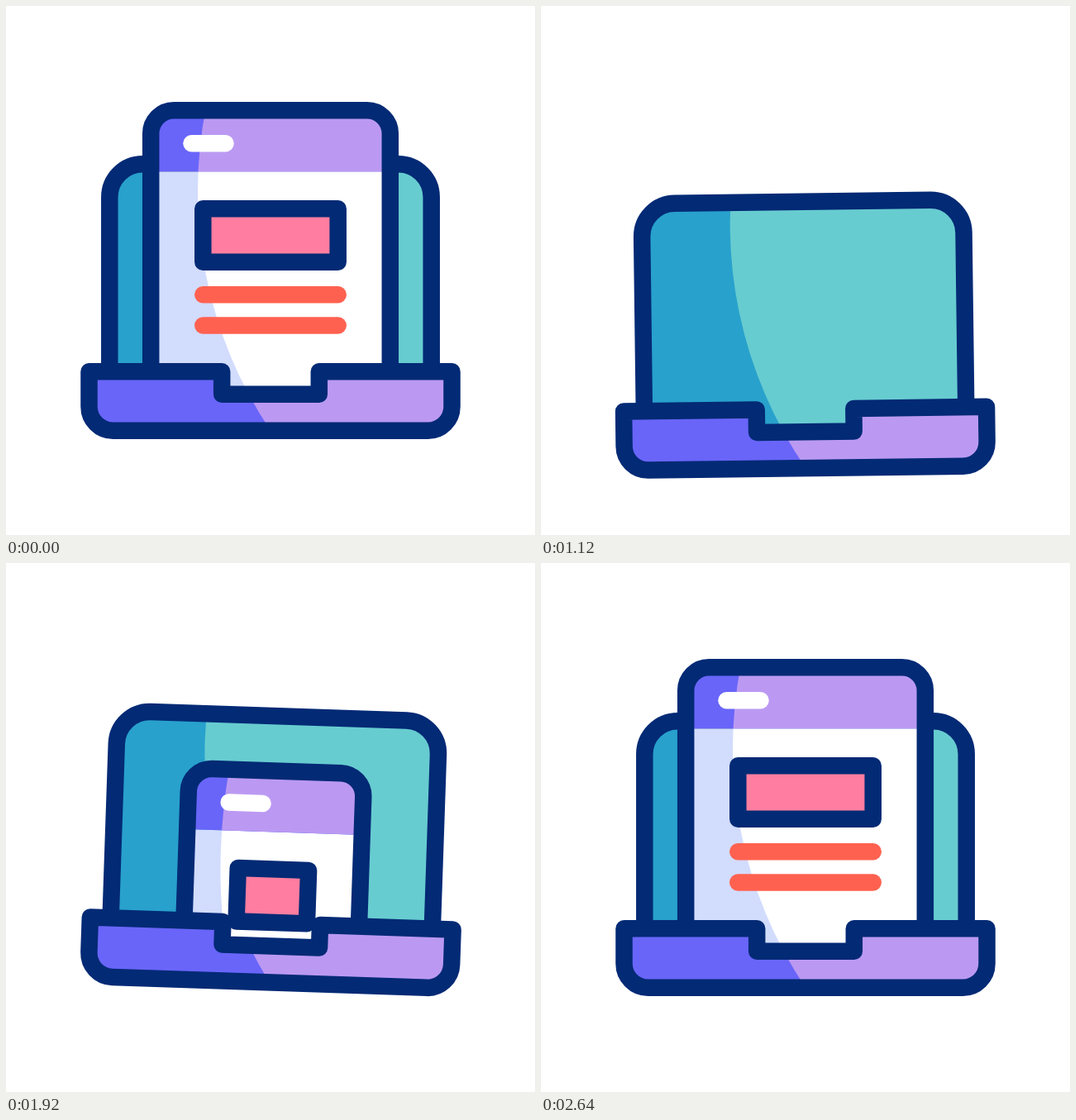
Animation, 640 px wide and 640 px high, one loop 3 s. Source, as an HTML page with a canvas:

```html
<!DOCTYPE html>
<html lang="en">
<head>
<meta charset="utf-8">
<title>Laptop page</title>
<style>
  html, body { margin: 0; width: 100%; height: 100%; overflow: hidden; background: #fff; }
  canvas { display: block; width: 100vmin; height: 100vmin; margin: auto; }
</style>
</head>
<body>
<canvas id="stage"></canvas>
<script>
const SIZE = 640, MID = SIZE / 2, LOOP = 3000, STEP = 40, LINE = 20.5;
const PIVOT = 478, SLOT = 470, HALF_PAGE = 144.8, HALF_BOX = 81.7;
const RAD = Math.PI / 180;
const C = {
  navy: '#032a75', violet: '#6965f9', lilac: '#bb99f2', blue: '#28a1cc', teal: '#67ccd0',
  pale: '#d2dcfd', white: '#fff', pink: '#fe7da0', red: '#ff6150', yellow: '#ffcc50'
};

const canvas = document.getElementById('stage');
const ctx = canvas.getContext('2d');
const ratio = window.devicePixelRatio || 1;
canvas.width = canvas.height = SIZE * ratio;

// Smooth progress from 0 to 1 between two times.
function ease(t, from, to) {
  const p = Math.min(1, Math.max(0, (t - from) / (to - from)));
  return p * p * (3 - 2 * p);
}

// Motion: each term is one eased move.
const lift = t => -26 * ease(t, 200, 520) + 78 * ease(t, 520, 1250) - 15 * ease(t, 1250, 1480)
  - 63 * ease(t, 1600, 2110) + 26 * ease(t, 2110, 2606);
const tilt = t => -2.95 * ease(t, 200, 460) + 4.95 * ease(t, 460, 1880) - 2 * ease(t, 1880, 2280);
const slide = t => 380 * (ease(t, 480, 1186) - ease(t, 1500, 2195));
const shrink = t => 39 * (ease(t, 200, 516) - ease(t, 2110, 2600));

function fill(path, color) {
  ctx.fillStyle = color;
  ctx.fill(path);
}

function stroke(path, color = C.navy) {
  ctx.strokeStyle = color;
  ctx.stroke(path);
}

function segment(x1, y1, x2, y2, color) {
  const path = new Path2D();
  path.moveTo(x1, y1);
  path.lineTo(x2, y2);
  stroke(path, color);
}

function box(half, top, height) {
  const path = new Path2D();
  path.rect(MID - half, top, half * 2, height);
  return path;
}

// An arch open at the bottom, centred on the stage.
function arch(half, top, bottom, r) {
  const left = MID - half, right = MID + half;
  const path = new Path2D();
  path.moveTo(left, bottom);
  path.arcTo(left, top, right, top, r);
  path.arcTo(right, top, right, bottom, r);
  path.lineTo(right, bottom);
  return path;
}

// Fills with the shade colour, then the lit colour inside a large round light.
function shaded(path, dark, lit, scale = 1) {
  fill(path, dark);
  ctx.save();
  ctx.beginPath();
  ctx.ellipse(MID + 433 * scale, 224, 521 * scale, 521, 0, 0, Math.PI * 2);
  ctx.clip();
  fill(path, lit);
  ctx.restore();
}

const screen = arch(194.7, 191.3, SLOT, 40);
const base = new Path2D(`M100.5 442.2 H261.2 V469.8 H378.8 V442.2 H539.5 V484.7
  A29 29 0 0 1 510.5 513.7 H129.5 A29 29 0 0 1 100.5 484.7 Z`);

// Three rays fan out from a point, each growing and then vanishing outward.
function drawRays(t, x, y, angle, start) {
  const near = 43 + 75 * ease(t, start + 80, start + 295);
  const far = 43 + 75 * ease(t, start, start + 220);
  if (far <= near) return;
  for (let i = -1; i <= 1; i++) {
    const a = (angle + 42.5 * i) * RAD, dx = Math.cos(a), dy = Math.sin(a);
    segment(x + dx * near, y + dy * near, x + dx * far, y + dy * far, C.yellow);
  }
}

function drawPage(drop, narrow) {
  const half = HALF_PAGE - narrow, inner = HALF_BOX - narrow;
  const scale = half / HALF_PAGE, pill = MID - half + 49.3;
  ctx.save();
  ctx.beginPath();
  ctx.rect(0, -100, SIZE, SLOT + 100);
  ctx.clip();
  ctx.translate(0, drop);

  shaded(box(half, 200.3, 300), C.pale, C.white, scale);
  shaded(arch(half, 126.3, 200.3, 28), C.violet, C.lilac, scale);
  stroke(arch(half, 126.3, 500, 28));
  segment(pill, 166.2, pill + 41, 166.2, C.white);

  const picture = box(inner, 245.3, 64.4);
  fill(picture, C.pink);
  stroke(picture);
  for (let i = 0; i < 2; i++) {
    const y = 349.2 + 37.3 * i;
    segment(MID - inner, y, MID + inner, y, C.red);
  }
  ctx.restore();
}

function draw(t) {
  ctx.setTransform(ratio, 0, 0, ratio, 0, 0);
  ctx.fillStyle = C.white;
  ctx.fillRect(0, 0, SIZE, SIZE);
  ctx.lineWidth = LINE;
  ctx.lineCap = ctx.lineJoin = 'round';

  drawRays(t, 136, 195, 227, 2148);
  drawRays(t, 490, 186, 324.7, 2183);

  ctx.translate(MID, PIVOT + lift(t));
  ctx.rotate(tilt(t) * RAD);
  ctx.translate(-MID, -PIVOT);
  shaded(screen, C.blue, C.teal);
  stroke(screen);
  drawPage(slide(t), shrink(t));
  shaded(base, C.violet, C.lilac);
  stroke(base);
}

function tick() {
  const t = performance.now() % LOOP;
  draw(Math.floor(t / STEP) * STEP);
  requestAnimationFrame(tick);
}
tick();
</script>
</body>
</html>
```
